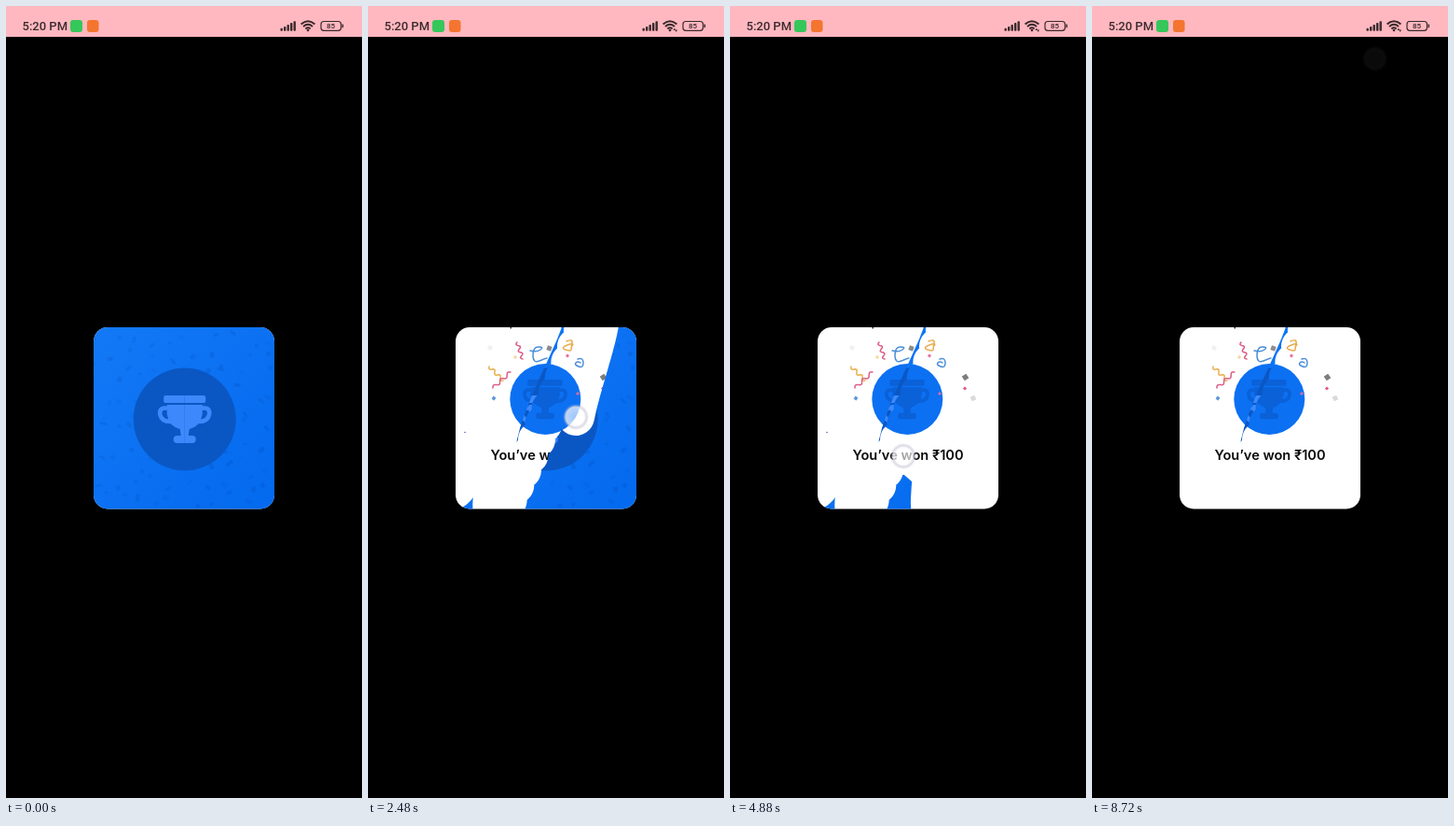
Recreate the animation shown at these times as an HTML page. Size 382 by 848 pixels, loop 8.88 s.

```html
<!DOCTYPE html>
<html lang="en">
<head>
<meta charset="utf-8">
<title>Scratch card</title>
<style>
  html, body { margin: 0; width: 100%; height: 100%; overflow: hidden; background: #000; }
  svg { display: block; width: 100%; height: 100%; }
  .clock { font: 500 13px Roboto, sans-serif; fill: #3a2a2d; }
  .level { font: 500 8px Roboto, sans-serif; fill: #3a2a2d; text-anchor: middle; }
  .prize { font: 600 14.6px Inter, sans-serif; fill: #0b0b0d; text-anchor: middle; }
  .line { fill: none; stroke-linecap: round; stroke-linejoin: round; }
</style>
</head>
<body>
<svg viewBox="0 0 382 848">
  <defs>
    <linearGradient id="blue" x2="1" y2="1">
      <stop offset="0" stop-color="#1479f6"/>
      <stop offset="1" stop-color="#0369ee"/>
    </linearGradient>
    <radialGradient id="glow">
      <stop offset="0" stop-color="#fff" stop-opacity=".6"/>
      <stop offset=".64" stop-color="#fff" stop-opacity=".7"/>
      <stop offset=".78" stop-color="#dcdce8" stop-opacity=".9"/>
      <stop offset=".86" stop-color="#c4c4d6" stop-opacity=".5"/>
      <stop offset="1" stop-color="#b4b4c8" stop-opacity="0"/>
    </radialGradient>
    <clipPath id="card"><rect x="94" y="344" width="194" height="194.5" rx="15"/></clipPath>
    <mask id="scratch" maskUnits="userSpaceOnUse" x="90" y="340" width="202" height="202">
      <rect x="90" y="340" width="202" height="202" fill="#fff"/>
      <g class="line" stroke="#000">
        <path id="smooth" stroke-width="40"/>
        <path id="core" stroke-width="35"/>
        <path id="bumps" stroke-width="40" stroke-dasharray=".01 18"/>
      </g>
    </mask>
    <g id="halfTrophy">
      <path d="M0 0H20.5Q22.5 0 22.5 2V6Q22.5 8 20.5 8H0ZM0 10H19V20Q17 33 5 36L4 43H8A4 4 0 0 1 8 51H0Z"/>
      <path class="line" stroke-width="4.5" d="M18 13.5H22Q27 14 26.5 20Q25 28 15 28"/>
    </g>
    <g id="trophy">
      <use href="#halfTrophy"/>
      <use href="#halfTrophy" transform="scale(-1 1)"/>
    </g>
  </defs>

  <rect width="382" height="33" fill="#ffb8c0"/>
  <text class="clock" x="17.5" y="26">5:20 PM</text>
  <rect x="69" y="15" width="13" height="13" rx="3" fill="#35c759"/>
  <rect x="87" y="15" width="12.5" height="13" rx="3" fill="#f4752f"/>
  <g id="signal" fill="#3a2a2d"></g>
  <g class="line" stroke="#3a2a2d" stroke-width="2" style="stroke-linecap:butt">
    <path d="M316.6 19.5Q324 13 331.4 19.5M319 22Q324 17.6 329 22M321.4 24.4Q324 22.2 326.6 24.4"/>
    <rect x="338" y="16.5" width="21.5" height="9.8" rx="3" stroke-width="1.2"/>
    <path d="M361.3 19.5V23.2" stroke-width="1.5"/>
  </g>
  <circle cx="324" cy="26" r="1.3" fill="#3a2a2d"/>
  <path id="traffic" d="M327.5 26l1.5-2.5l1 2.5ZM329.5 25.5h2.5l-1.3 2.5Z" fill="#3a2a2d"/>
  <text class="level" x="348.5" y="24.4">85</text>

  <g clip-path="url(#card)">
    <rect x="94" y="344" width="194" height="195" fill="#fff"/>
    <circle cx="190.3" cy="421" r="38" fill="#0c70f2"/>
    <use href="#trophy" transform="translate(190 400) scale(.83)" fill="#0a61d8" stroke="#0a61d8" stroke-width="0"/>
    <g id="ribbons" class="line" stroke-width="1.5">
      <path stroke="#4c8fd8" d="M174 369Q181 371 185 368T183 365T177 374T184 380T192 377"/>
      <path stroke="#e9ac4f" d="M213 359Q220 356 219 361T218 368T212 368T214 363T219 364"/>
      <path stroke="#4c8fd8" d="M225 378Q231 376 231 382T226 386T223 382T228 382"/>
    </g>
    <g id="confetti"></g>
    <circle id="speck" cx="104" cy="456.5" r=".8" fill="#4b66b8"/>
    <rect x="152.5" y="344" width="1.5" height="1.5" fill="#333"/>
    <text class="prize" x="191" y="486">You’ve won ₹100</text>
    <g mask="url(#scratch)">
      <rect x="94" y="344" width="194" height="195" fill="url(#blue)"/>
      <g id="flecks" fill="#0450bd"></g>
      <circle cx="191.7" cy="442.5" r="55" fill="#0a57c4"/>
      <use href="#trophy" transform="translate(191.7 417)" fill="#3d89fb" stroke="#3d89fb" stroke-width="0"/>
    </g>
  </g>
  <circle id="touch" r="14" fill="url(#glow)"/>
</svg>
<script>
const LOOP = 8880, STEP = 80;
const $ = id => document.getElementById(id);

// Finger: time, x, y
const path = [
  [80, 122, 444], [280, 124, 400], [440, 133, 335], [520, 108, 345], [640, 88, 425],
  [800, 90, 511], [880, 98, 511], [1040, 128, 420], [1200, 189, 335], [1370, 142, 453],
  [1500, 134, 555], [1600, 165, 499], [1680, 203, 414], [1840, 234, 340], [2000, 250, 334],
  [2480, 223, 440], [2840, 215, 512], [2960, 217, 538], [3120, 251, 450], [3280, 285, 347],
  [3440, 290, 390], [3760, 258, 505], [3920, 242, 554], [4240, 285, 465], [4400, 286, 505],
  [4560, 270, 550], [4800, 215, 500], [4880, 186, 482], [5200, 183, 621], [5520, 104, 530],
  [6000, 115, 469], [6480, 160, 570], [6720, 180, 572]
];
const roughSpans = [[1540, 1840], [2960, 3280]];
const smoothSpans = [[80, 1540], [1840, 2960], [3280, 6720]];

function finger(t) {
  let i = path.findIndex(p => p[0] > t);
  if (i < 0) return path.at(-1).slice(1);
  i = Math.max(i, 1);
  const a = path[i - 1], b = path[i];
  const before = path[i - 2] || a, after = path[i + 1] || b;
  const span = b[0] - a[0], u = Math.max(0, (t - a[0]) / span);
  // Hermite curve with tangents that respect uneven timing
  return [1, 2].map(k => {
    const slope = (p, q) => (q[k] - p[k]) / (q[0] - p[0]) * span;
    const m0 = slope(before, b), m1 = slope(a, after), d = b[k] - a[k];
    return a[k] + u * (m0 + u * (3 * d - 2 * m0 - m1 + u * (m0 + m1 - 2 * d)));
  });
}

function trail(spans, now) {
  let d = '';
  for (const [from, to] of spans) {
    if (now <= from) continue;
    const end = Math.min(to, now), points = [];
    for (let t = from; t <= end; t += 20) points.push(finger(t).map(v => v.toFixed(1)));
    d += 'M' + points.join('L');
  }
  return d;
}

function add(parent, tag, attrs) {
  const el = document.createElementNS('http://www.w3.org/2000/svg', tag);
  for (const name in attrs) el.setAttribute(name, attrs[name]);
  $(parent).append(el);
}

for (let i = 0; i < 5; i++) {
  const h = 3 + i * 1.9;
  add('signal', 'rect', { x: 294.5 + i * 3.5, y: 26.8 - h, width: 2.4, height: h, rx: .8 });
}

function ribbon(x, y, dx, dy, stroke) {
  const length = Math.hypot(dx, dy), points = [];
  for (let u = 0; u <= 1.001; u += .04) {
    const w = 1.8 * Math.sin(u * Math.PI * 5) / length;
    points.push([x + dx * u - dy * w, y + dy * u + dx * w]);
  }
  add('ribbons', 'path', { stroke, d: 'M' + points.join('L') });
}
ribbon(130, 386, 15, 15, '#e9b04c');
ribbon(153, 392, -19, 17, '#dc5d86');
ribbon(160, 360, 6, 18, '#dc5d86');

function scrap(x, y, size, fill, angle) {
  add('confetti', 'rect', {
    x: -size / 2, y: -size / 2, width: size, height: size, fill,
    transform: `translate(${x} ${y}) rotate(${angle})`
  });
}
scrap(131, 366, 4.5, '#f0f0f0', 20);
scrap(135, 420, 3.5, '#5d98dc', 30);
scrap(158, 376, 3, '#f6d9a0', 20);
scrap(194.5, 366.5, 5, '#8c8c8c', 20);
scrap(214, 374.5, 3, '#e6719a', 30);
scrap(252.5, 397.5, 5.5, '#7d7d7d', 55);
scrap(252, 409.5, 3, '#e2557f', 45);
scrap(261, 420, 5, '#dadada', 65);
scrap(225, 415, 3, '#c86fa6', 40);

let seed = 11;
const random = () => (seed = seed * 16807 % 2147483647) / 2147483647;
for (let row = 0; row < 10; row++) for (let col = 0; col < 10; col++) {
  const x = 96 + (col + random()) * 19, y = 346 + (row + random()) * 19;
  add('flecks', 'rect', {
    width: 2 + random() * 3, height: 3 + random() * 5, rx: 1, opacity: .08 + random() * .22,
    transform: `translate(${x} ${y}) rotate(${random() * 180})`
  });
}

function touchAlpha(t) {
  if (t >= 8480) return .015 * ((t - 8480) / STEP + 1);
  if (t < 80 || t > 6720) return 0;
  return Math.min(1, (t - 40) / 120, (6800 - t) / 160);
}

function draw(clock) {
  const t = Math.min(8720, Math.floor(clock % LOOP / STEP) * STEP);
  const rough = trail(roughSpans, t);
  $('smooth').setAttribute('d', trail(smoothSpans, t));
  $('core').setAttribute('d', rough);
  $('bumps').setAttribute('d', rough);
  const [x, y] = t >= 8480 ? [303.5, 56.5] : finger(t);
  $('touch').setAttribute('transform', `translate(${x} ${y})`);
  $('touch').setAttribute('opacity', touchAlpha(t));
  $('traffic').setAttribute('opacity', t >= 1040 ? 1 : 0);
  $('speck').setAttribute('opacity', t < 6960 ? 1 : 0);
}

function tick() {
  draw(performance.now());
  requestAnimationFrame(tick);
}
tick();
</script>
</body>
</html>
```
